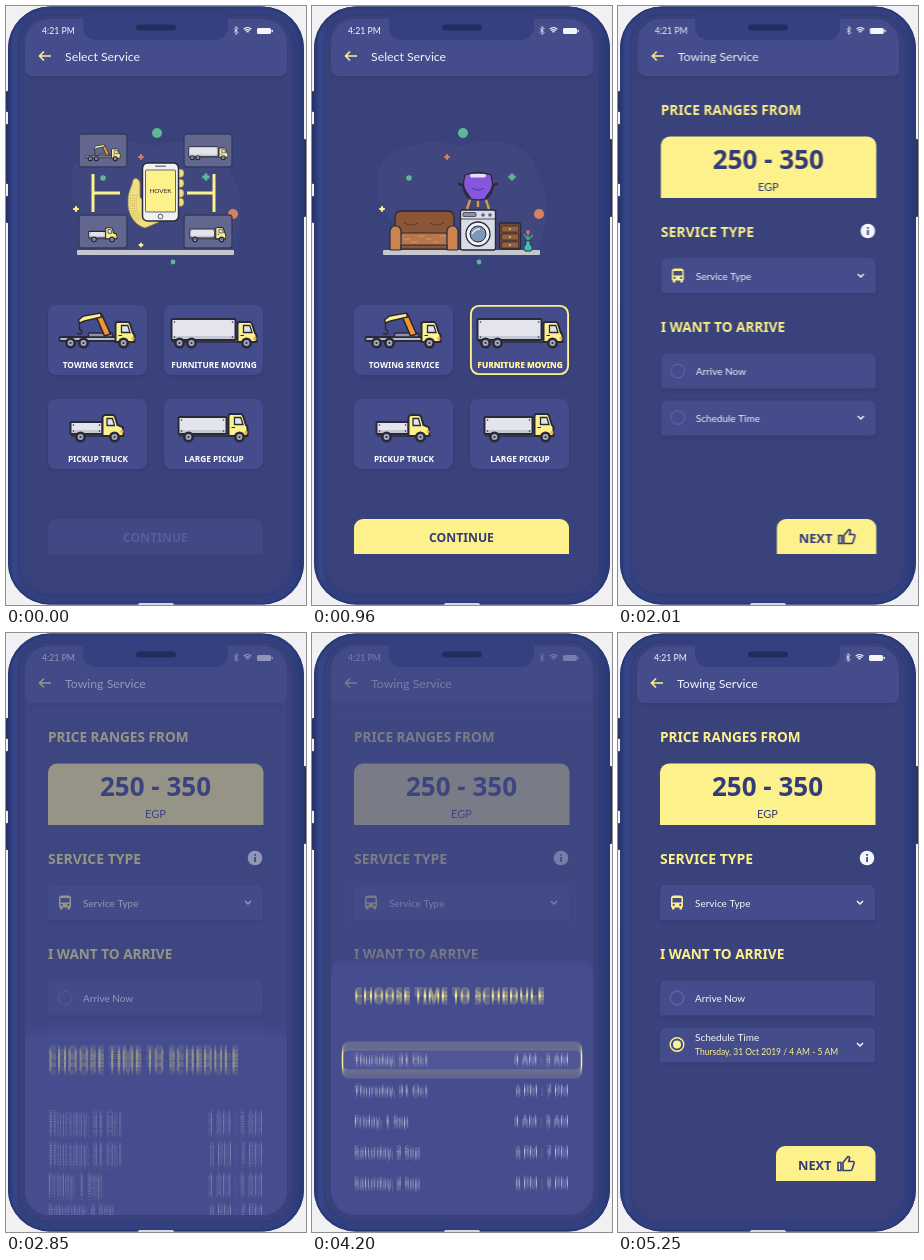
Recreate the animation shown at these times as an HTML page with a canvas. Size 300x599 px, loop 5.28 s.

```html
<!DOCTYPE html>
<html lang="en">
<head>
<meta charset="utf-8">
<title>Service booking</title>
<style>
  html, body { margin: 0; width: 100%; height: 100%; overflow: hidden; background: #f1f1f4; }
  canvas { display: block; width: 300px; height: 599px; }
</style>
</head>
<body>
<canvas id="stage" width="300" height="599"></canvas>
<script>
const W = 300, H = 599, LOOP = 5280;
const out = document.getElementById('stage').getContext('2d');
const buffer = document.createElement('canvas');
buffer.width = W; buffer.height = H;
const g = buffer.getContext('2d');

const BG = '#3a427c', CARD = '#444c8b', YELLOW = '#fdf18b', INK = '#29293a';
const NAVY = '#333b78', WHITE = '#f4f5fb', GREEN = '#5cb895', ORANGE = '#d5835d';
const BODY_FONT = 'Lato, "Open Sans", sans-serif';
const BOLD_FONT = '"Noto Sans", "Open Sans", sans-serif';

// timing helpers
const clamp = v => Math.max(0, Math.min(1, v));
const ramp = (t, a, b) => clamp((t - a) / (b - a));
const smooth = (t, a, b) => { const u = ramp(t, a, b); return u * u * (3 - 2 * u); };
const easeOut = u => 1 - (1 - u) * (1 - u);
const bump = (t, mid, half) => clamp(1 - Math.abs(t - mid) / half);

// drawing helpers
function paint(fill, stroke, lw = 1) {
  if (fill) { g.fillStyle = fill; g.fill(); }
  if (stroke) { g.strokeStyle = stroke; g.lineWidth = lw; g.stroke(); }
}
function box(x, y, w, h, r, fill, stroke, lw) {
  g.beginPath(); g.roundRect(x, y, w, h, r); paint(fill, stroke, lw);
}
function dot(x, y, r, fill, stroke, lw) {
  g.beginPath(); g.arc(x, y, r, 0, 7); paint(fill, stroke, lw);
}
function poly(pts, fill, stroke, lw) {
  g.beginPath();
  for (let i = 0; i < pts.length; i += 2) g.lineTo(pts[i], pts[i + 1]);
  if (fill) g.closePath();
  paint(fill, stroke, lw);
}
function shape(d, fill, stroke, lw, x = 0, y = 0) {
  g.save(); g.translate(x, y);
  const p = new Path2D(d);
  if (fill) { g.fillStyle = fill; g.fill(p); }
  if (stroke) { g.strokeStyle = stroke; g.lineWidth = lw || 1; g.stroke(p); }
  g.restore();
}
// y is the middle of the capitals
function text(s, x, y, size, color, weight = 400, align = 'left') {
  g.font = `${weight} ${size}px ${weight > 500 ? BOLD_FONT : BODY_FONT}`;
  g.textAlign = align;
  g.fillStyle = color;
  g.fillText(s, x, y + size * 0.357);
}
function layer(alpha, draw, cx = 0, cy = 0, scale = 1) {
  if (alpha <= 0) return;
  g.save();
  g.globalAlpha *= alpha;
  g.translate(cx, cy); g.scale(scale, scale); g.translate(-cx, -cy);
  draw();
  g.restore();
}
function place(draw, x, y, s = 1) {
  g.save(); g.translate(x, y); g.scale(s, s); draw(); g.restore();
}
function shadowed(draw, blur = 6) {
  g.save();
  g.shadowColor = 'rgba(36,42,92,.35)'; g.shadowBlur = blur; g.shadowOffsetY = 2;
  draw();
  g.restore();
}

// trucks stand on y = 0, centred on x = 0
function wheels(...xs) {
  for (const x of xs) {
    dot(x, -5, 5.5, INK);
    dot(x, -5, 2.9, '#a8aabb');
    dot(x, -5, 1.1, INK);
  }
}
function cab(x, top) {
  shape(`M0 -6V${top + 2}Q0 ${top} 2 ${top}H12Q14 ${top} 14.6 ${top + 2}L17.5 ${top + 11}Q19 ${top + 12} 19 ${top + 14}V-6Z`,
    YELLOW, INK, 2, x);
  shape(`M6 ${top + 3.5}H12.3L14.5 ${top + 10.5}H6Z`, '#dfe4f1', INK, 1.3, x);
  poly([x + 3, top + 13.5, x + 6.5, top + 13.5], null, INK, 1.2);
  box(x + 16, -11, 3, 3, 1, '#f0a94b');
}
function cargo(x, y, w, h) {
  box(x, y, w, h, 1, '#e4e5ec', INK, 2);
  box(x + 1.5, y + h - 4, w - 3, 3, 0, '#c6c8d4');
  for (const [a, b] of [[3, 3], [w - 3, 3], [3, h - 3], [w - 3, h - 3]]) dot(x + a, y + b, 0.8, INK);
}
function towTruck() {
  box(-38, -11, 58, 4, 1, '#b9bbc9', INK, 1.8);
  box(-9, -15, 24, 4, 1, '#8f92a8', INK, 1.5);
  poly([-2, -33, 4, -34, 13, -14, 7, -12], '#f0952f', INK, 1.6);
  poly([-19, -28, -14, -32, 3, -35, 4, -31, -13, -27, -18, -25], YELLOW, INK, 1.5);
  poly([-18, -26, -18, -18], null, INK, 1.4);
  g.beginPath(); g.arc(-18, -16, 2.2, -1.5, 2.8); paint(null, INK, 1.5);
  cab(18, -26);
  wheels(-27, -14, 26);
}
function van() {
  box(-41, -9, 80, 3, 1, '#777a91', INK, 1.3);
  cargo(-42, -29, 64, 21);
  cab(24, -26);
  wheels(-34, -22, 33);
}
function pickup() {
  box(-26, -9, 50, 3, 1, '#777a91', INK, 1.3);
  cargo(-27, -20, 32, 12);
  shape('M5 -6V-25Q6 -27 8 -27H15Q17 -27 18 -24L20 -17L25 -15Q26 -14 26 -6Z', YELLOW, INK, 2);
  shape('M9.5 -23.5H15L17 -16.5H9.5Z', '#dfe4f1', INK, 1.3);
  box(23, -12, 3, 3, 1, '#f0a94b');
  wheels(-17, 17);
}
function largePickup() {
  box(-34, -9, 66, 3, 1, '#777a91', INK, 1.3);
  cargo(-35, -25, 48, 17);
  cab(15, -28);
  wheels(-25, 26);
}

// illustrations
function plus(x, y, r, color) {
  shape(`M${-r} 0H${r}M0 ${-r}V${r}`, null, color, r * 0.8, x, y);
}
function confetti() {
  shape('M65 178C66 150 82 143 104 139C126 130 138 143 158 138C190 130 218 140 224 164C241 195 236 222 224 244H90C88 216 64 205 65 178Z', '#40467e');
  dot(151, 127, 5, GREEN);
  dot(97, 172, 2.8, GREEN);
  dot(167, 256, 2.4, GREEN);
  dot(227, 208, 5, ORANGE);
  plus(135, 151, 2.7, ORANGE);
  plus(200, 171, 3.6, GREEN);
  plus(70, 203, 2.8, YELLOW);
}
function callScene() {
  plus(135, 239, 2.3, YELLOW);
  const tiles = [[73, 128, towTruck, 155, .47], [178, 128, van, 154, .46],
                 [73, 209, pickup, 236, .53], [178, 209, largePickup, 236, .52]];
  for (const [x, y, truck, ground, s] of tiles) {
    box(x, y, 48, 33, 3, '#62678f', '#373a5c', 1.4);
    place(truck, x + 24, ground, s);
  }
  shape('M87 168V206M87 187H114M208 168V206M181 187H208', null, YELLOW, 3);
  box(71, 244, 157, 5, 1, '#c5c6d0');
  shape('M139 222C128 219 121 207 122 195C122 185 126 181 127 174C129 171 134 173 134 178L134 191L142 200L153 216Z', '#f1df7d', '#8d8559', .8);
  g.save();
  g.setLineDash([1, 1.6]);
  for (let i = 0; i < 4; i++) shape(`M${125 + i * 2} 189Q${122 + i * 2} 205 ${131 + i * 2} 215`, null, '#ab9d5e', .8);
  g.restore();
  for (const y of [163, 173, 183, 192]) box(166, y, 12, 8.5, 4, '#f1df7d', '#7d774f', .7);
  box(136.5, 157, 36, 58, 5, '#f1f1f4', INK, 1.5);
  box(139.5, 164, 30, 42, 1, YELLOW, INK, .7);
  box(149, 159.5, 11, 1.6, 1, '#777a91');
  dot(154.5, 210.5, 2.3, '#fff', INK, .8);
  text('HOVEK', 154.5, 185, 6.4, INK, 400, 'center');
}
function homeScene() {
  box(71, 244, 157, 5, 1, '#c5c6d0');
  // sofa
  box(83, 205, 59, 34, 6, '#8b5637', INK, 1.3);
  shape('M92 217Q99 221 106 217M118 217Q125 221 132 217', null, '#5d3827', 1);
  box(88, 227, 48, 13, 3, '#b9764a', INK, 1.1);
  for (let i = 0; i < 40; i++) dot(91 + (i * 7) % 43, 230 + (i * 3) % 9, .5, '#e0a36d');
  box(78, 220, 11, 24, [5, 5, 1, 1], '#c98450', INK, 1.2);
  box(135, 220, 11, 24, [5, 5, 1, 1], '#c98450', INK, 1.2);
  box(89, 239, 46, 4, 0, '#8b5637', INK, 1);
  // washer
  box(148.5, 204, 35, 40, 2, '#d8dde6', INK, 1.4);
  box(151, 206.5, 13, 4, 1, '#8a90a8', INK, .7);
  dot(171, 209, 1.8, '#5a6080'); dot(178, 209, 1.8, '#5a6080');
  poly([149, 213, 183, 213], null, INK, .8);
  dot(166, 228, 12, '#f3f5f9', INK, 1.3);
  dot(166, 228, 8, '#7f98b5', INK, 1);
  shape('M160 228Q163 223 168 223', null, '#dbe7f2', 1.5);
  // armchair
  shape('M158 194L155 203M174 194L177 203M166 194V201', null, '#d79a4c', 2.4);
  shape('M153 169Q166 164 179 169Q183 184 177 191Q166 197 155 191Q149 184 153 169Z', '#8657dc', INK, 1.3);
  shape('M146 178Q151 177 153 185L158 192M186 178Q181 177 179 185L174 192', null, INK, 2.2);
  box(158, 168, 16, 3.5, 1.7, '#e7dcfa');
  shape('M160 182Q166 186 172 182', null, '#51319c', 1);
  // drawers
  box(187.5, 217, 21, 26, 1.5, '#714832', INK, 1.3);
  for (const y of [220, 228, 236]) {
    box(189.5, y, 17, 6, 1, '#94613f', INK, .7);
    dot(198, y + 3, 1, '#e7b978');
  }
  // vase
  shape('M216 237V227M216 234L212 228M216 234L221 229', null, '#4cae85', 1.3);
  dot(216, 226, 2, '#db6c62');
  shape('M213 235H219L218 238Q222 242 219 245H213Q210 242 214 238Z', '#40bdb5', INK, 1);
}

// shared screen parts
function topBar(title) {
  shadowed(() => box(19, 0, 262, 70, [0, 0, 7, 7], CARD));
  text('4:21 PM', 36, 25, 8.7, WHITE);
  shape('M-2 -2L2 2L0 4V-4L2 -2L-2 2', null, WHITE, .8, 230, 24.5);
  for (const r of [1.8, 3.8, 5.8]) {
    g.beginPath(); g.arc(241.5, 27.5, r, -2.3, -.84); paint(null, WHITE, 1.2);
  }
  box(251, 22, 14, 6, 1.5, WHITE);
  box(265.6, 23.8, 1.2, 2.4, .5, WHITE);
  shape('M45 50H33.5M38 45.5L33.5 50L38 54.5', null, YELLOW, 1.6);
  text(title, 59, 51, 12.3, WHITE);
}
function serviceCard(x, y, name, truck, selected = 0) {
  shadowed(() => box(x, y, 99, 70, 8, CARD), 4);
  place(truck, x + 49.5, y + 43);
  const tag = color => text(name, x + 50, y + 60, 8.3, color, 700, 'center');
  tag('#fff');
  layer(selected, () => {
    tag(YELLOW);
    box(x + .9, y + .9, 97.2, 68.2, 8, null, YELLOW, 1.9);
  });
}
function selectScreen(t) {
  g.fillStyle = BG; g.fillRect(0, 0, W, H);
  topBar('Select Service');
  const swap = smooth(t, 650, 930);
  confetti();
  layer(1 - swap, callScene);
  layer(swap, homeScene);

  serviceCard(42, 299, 'TOWING SERVICE', towTruck);
  serviceCard(42, 393, 'PICKUP TRUCK', pickup);
  serviceCard(158, 393, 'LARGE PICKUP', largePickup);
  const press = bump(t, 570, 110), chosen = smooth(t, 460, 590);
  layer(1 - .38 * press, () => serviceCard(158, 299, 'FURNITURE MOVING', van, chosen), 208, 334, 1 - .05 * press);

  const hit = bump(t, 1560, 100);
  const button = (fill, ink) => {
    box(42, 513, 215, 35, [9, 9, 0, 0], fill);
    text('CONTINUE', 149.5, 532, 12.2, ink, 700, 'center');
  };
  layer(1 - swap, () => button('#414884', '#565d9b'));
  layer(swap * (1 - .2 * hit), () => button(YELLOW, NAVY), 149.5, 531, 1 - .028 * hit);
}

function field(y, label, labelY = y + 18) {
  shadowed(() => box(42, y, 215, 35, [6, 6, 1, 1], CARD), 5);
  text(label, 77, labelY, 10, WHITE);
}
function chevron(y) {
  shape('M-3 -1.5L0 1.5L3 -1.5', null, WHITE, 1.5, 242, y);
}
function radio(y, on) {
  dot(59, y, 6.8, null, on ? YELLOW : '#5b63a3', 1.4);
  if (on) dot(59, y, 4, YELLOW);
}
function busIcon(x, y) {
  box(x - 6, y - 7, 12, 12, [3, 3, 1, 1], YELLOW);
  box(x - 4.5, y - 4.5, 9, 4.5, 0, CARD);
  dot(x - 3.3, y + 2.4, 1.1, CARD); dot(x + 3.3, y + 2.4, 1.1, CARD);
  box(x - 5, y + 4, 2.5, 3, .5, YELLOW); box(x + 2.5, y + 4, 2.5, 3, .5, YELLOW);
}
function orderScreen(t) {
  const booked = t >= 4110;
  g.fillStyle = BG; g.fillRect(0, 0, W, H);
  topBar('Towing Service');
  text('PRICE RANGES FROM', 42, 104, 13.6, YELLOW, 700);
  box(42, 130.5, 215.5, 61.5, [9, 9, 0, 0], YELLOW);
  text('250 - 350', 149.5, 153.5, 26, NAVY, 700, 'center');
  text('EGP', 149.5, 181, 11, NAVY, 400, 'center');

  text('SERVICE TYPE', 42, 226, 14, YELLOW, 700);
  dot(249, 225, 7.3, WHITE);
  box(248.2, 224, 1.7, 5, 0, BG); box(248.2, 221, 1.7, 1.8, 0, BG);
  field(252, 'Service Type');
  busIcon(59, 269.5);
  chevron(269.5);

  text('I WANT TO ARRIVE', 42, 321, 13.6, YELLOW, 700);
  field(347.5, 'Arrive Now');
  radio(365, false);
  field(394.5, 'Schedule Time', booked ? 404 : 412.5);
  if (booked) text('Thursday, 31 Oct 2019 / 4 AM - 5 AM', 77, 419, 8.5, YELLOW);
  radio(411.5, booked);
  chevron(411.5);

  box(158, 513, 99.5, 35, [9, 9, 0, 0], YELLOW);
  text('NEXT', 180, 532, 12.8, NAVY, 700);
  shape('M-8 -1H-5V7H-8ZM-3 7V-1L2 -7Q4 -7 3.5 -5L2.7 -2H7Q8.5 -2 8 0L6 6Q5.6 7 4.5 7Z', null, NAVY, 1.6, 228, 530.5);
}

// schedule sheet, 0 = hidden, 1 = open
function sheetOpen(t) {
  if (t < 4110) return easeOut(ramp(t, 2711, 3011));
  return 1 - ramp(t, 4110, 4470) ** 2;
}
const SLOTS = [
  ['Thursday, 31 Oct', '4 AM - 5 AM'],
  ['Thursday, 31 Oct', '6 PM - 7 PM'],
  ['Friday, 1 Sep', '4 AM - 5 AM'],
  ['Saturday, 2 Sep', '6 PM - 7 PM'],
  ['Saturday, 2 Sep', '8 PM - 9 PM']
];
function sheet(t) {
  const open = sheetOpen(t);
  if (open <= 0) return;
  g.fillStyle = `rgba(66,75,134,${.74 * open})`;
  g.fillRect(0, 0, W, H);
  g.save();
  g.translate(0, (1 - open) * 291);
  shadowed(() => box(19, 308, 262, 290, [9, 9, 0, 0], '#454d8f'), 8);
  text('CHOOSE TIME TO SCHEDULE', 42, 344, 13.8, YELLOW, 700);
  layer(smooth(t, 3450, 3650), () => box(30.5, 394, 239, 28, 6, 'rgba(255,255,255,.06)', YELLOW, 1.5));
  SLOTS.forEach(([day, hours], i) => {
    const y = 408 + i * 30.8;
    text(day, 42, y, 9.8, WHITE);
    text(hours, 257, y, 9.6, WHITE, 400, 'right');
  });
  g.restore();
}

function phone() {
  g.fillStyle = '#f1f1f4'; g.fillRect(0, 0, W, H);
  for (const [x, y, h] of [[0, 85, 21], [0, 118, 60], [0, 190, 27], [296, 133, 78]]) box(x, y, 4, h, 1, '#273266');
  const body = g.createLinearGradient(2, 0, 298, 0);
  [[0, '#27356f'], [.02, '#37468a'], [.045, '#33407f'], [.955, '#33407f'], [.98, '#2f3c7c'], [1, '#27356f']]
    .forEach(([p, c]) => body.addColorStop(p, c));
  box(2, 0.5, 296, 598, 42, body);
  box(3, 1.5, 294, 596, 41, null, '#2b3974', 2);
  box(12.5, 9, 275, 580, 31, '#38417c', '#303b76', 1);
  box(132, 597, 36, 4, 2, '#d5d8e2');
}
function render(t) {
  phone();
  g.save();
  g.beginPath(); g.roundRect(19, 13, 262, 569, 24); g.clip();
  const push = easeOut(ramp(t, 1680, 2030)) * 262;
  if (push < 262) {
    g.save(); g.translate(-push, 0); selectScreen(t); g.restore();
  }
  if (push > 0) {
    g.save(); g.translate(262 - push, 0);
    g.beginPath(); g.rect(19, 0, 262, H); g.clip();
    orderScreen(t);
    g.restore();
  }
  sheet(t);
  g.restore();
  box(77, 8, 145, 26, [0, 0, 13, 13], '#344080');
  box(130, 18.5, 40, 6, 3, '#222c5d');
}

// moving phases are averaged over a short shutter
const SHUTTER = 20;
const MOVES = [[1680, 2030], [2711, 3011], [4110, 4470]];
function draw(now) {
  const t = now % LOOP;
  const n = MOVES.some(([a, b]) => t > a && t < b) ? 10 : 1;
  for (let i = 0; i < n; i++) {
    render(n > 1 ? t + (i / (n - 1) - .5) * SHUTTER : t);
    out.globalAlpha = 1 / (i + 1);
    out.drawImage(buffer, 0, 0);
  }
}
const start = performance.now();
function tick() {
  draw(performance.now() - start);
  requestAnimationFrame(tick);
}
tick();
</script>
</body>
</html>
```
